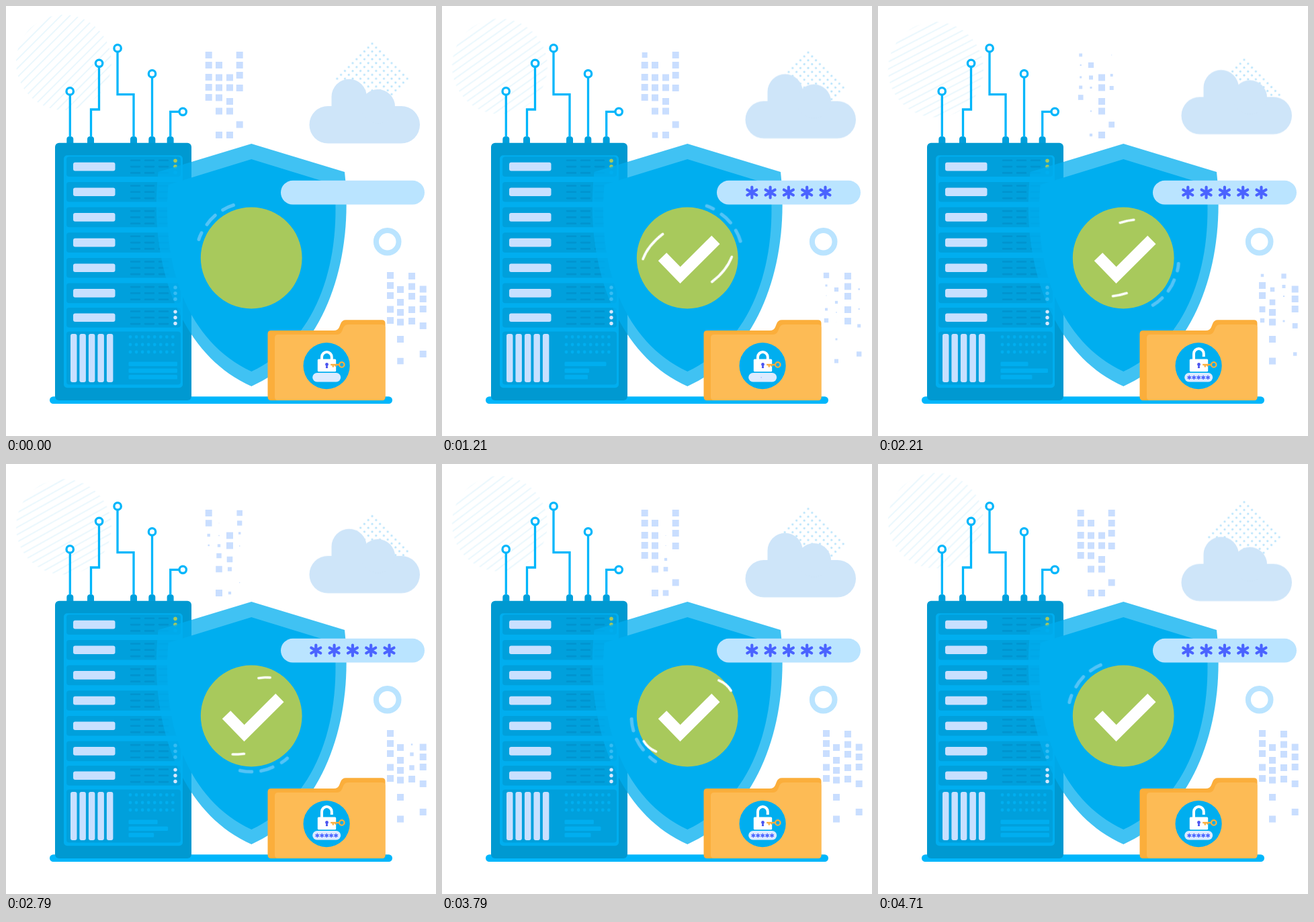
An HTML page without scripts for the animation above (4.78 s loop, 640 px wide and 640 px high).

```html
<!DOCTYPE html>
<html lang="en">
<head>
<meta charset="utf-8">
<title>Server security</title>
<style>
/* --t is the clock: milliseconds into the loop */
@property --t { syntax: "<number>"; inherits: true; initial-value: 0; }
html, body { margin: 0; width: 100%; height: 100%; overflow: hidden; background: #fff; }
svg { display: block; width: 100%; height: 100%; animation: clock 4780ms linear infinite; }
@keyframes clock { to { --t: 4780; } }

.drift { animation: drift 2390ms linear infinite alternate; }
@keyframes drift { to { transform: translateY(var(--dy)); } }
.turn { transform-origin: 86px 84px; animation: turn 2390ms linear infinite alternate; }
@keyframes turn { to { transform: rotate(19deg); } }
.spin { transform-origin: 365px 375px; animation: spin 4780ms linear infinite; }
@keyframes spin { to { transform: rotate(360deg); } }

/* each square vanishes at --z and grows back */
.blocks { fill: #c9deff; }
.blocks rect {
  width: 10px; height: 10px; transform-box: fill-box; transform-origin: center;
  scale: min(1, max(var(--t) - var(--z), var(--z) - var(--t)) / 780);
}

.stars { --gap: 150; }
.stars use {
  transform-box: fill-box; transform-origin: center;
  scale: clamp(0, (var(--t) - var(--from) - var(--gap) * var(--i)) / 150, 1);
}
.tick {
  stroke-dasharray: 113 200;
  stroke-dashoffset: calc(113px - 113px * clamp(0, (var(--t) - 100) / 860, 1));
  opacity: clamp(0, var(--t) - 100, 1);
}
.shackle { translate: 0 calc(-5px * clamp(0, (var(--t) - 1950) / 180, 1)); }

.gleam { animation: gleam 4780ms linear infinite; }
@keyframes gleam {
  0%, 14.6% { stroke-dasharray: 0 198; stroke-dashoffset: 190; opacity: 0; }
  14.7% { opacity: 1; }
  25.3% { stroke-dasharray: 48 150; stroke-dashoffset: 161; }
  46.2% { stroke-dasharray: 21 177; stroke-dashoffset: 77; }
  71.8% { stroke-dasharray: 13 185; stroke-dashoffset: 43; }
  88.1% { stroke-dasharray: 38 160; stroke-dashoffset: 3; }
  96.2% { stroke-dasharray: 0 198; stroke-dashoffset: -70; opacity: 1; }
  96.3%, 100% { stroke-dasharray: 0 198; stroke-dashoffset: -70; opacity: 0; }
}

.bars rect { x: 182.5px; height: 6.5px; animation: bar 4780ms linear infinite; }
@keyframes bar {
  0%, 98.5%, 100% { width: 72.5px; }
  10.5% { width: var(--a); }
  25.3% { width: var(--b); }
  46.2% { width: var(--c); }
  71.8% { width: var(--d); }
  88.1% { width: var(--e); }
}
</style>
</head>
<body>
<svg viewBox="0 0 640 640" xmlns="http://www.w3.org/2000/svg">
  <defs>
    <pattern id="hatch" width="9.5" height="9.5" patternUnits="userSpaceOnUse" patternTransform="translate(86 84) rotate(-45)">
      <path d="M0 4.75H9.5" stroke="#d8f1fc" stroke-width="1.1"/>
    </pattern>
    <pattern id="dots" width="8.2" height="8.2" patternUnits="userSpaceOnUse">
      <circle cx="4.1" cy="4.1" r="1.5" fill="#b5e2fb"/>
    </pattern>
    <path id="star" d="M0-8V8M-7-4 7 4M-7 4 7-4" fill="none" stroke="#4a63ff" stroke-width="4.2" stroke-linecap="round"/>
    <g id="unit">
      <rect x="90" y="-14.8" width="170" height="29.6" rx="4" fill="#00a0dc"/>
      <rect x="100" y="-6.3" width="62.5" height="12.6" rx="3" fill="#c8e0ff"/>
      <path d="M186-9.3h13m8 0h13m8 0h13M186 0h13m8 0h13m8 0h13M186 9.3h13m8 0h13m8 0h13" stroke="#0094cf" stroke-width="2.6" stroke-linecap="round"/>
    </g>
    <g id="leds">
      <circle cx="252" cy="-8.7" r="2.7"/><circle cx="252" r="2.7"/><circle cx="252" cy="8.7" r="2.7"/>
    </g>
    <rect id="slot" y="488" width="9.5" height="72" rx="3" fill="#c8e0ff"/>
    <path id="stub" d="M-5 205V198q0-4 5-4t5 4V205z" fill="#009fdb"/>
  </defs>

  <!-- background -->
  <g class="drift" style="--dy:11.5px"><circle class="turn" cx="86" cy="84" r="71" fill="url(#hatch)"/></g>
  <g class="drift" style="--dy:26px"><rect width="82" height="82" fill="url(#dots)" transform="translate(545 50.2) rotate(45)"/></g>
  <g class="drift" style="--dy:-14.7px" fill="#cee5f9">
    <rect x="451.5" y="149" width="164.5" height="55.5" rx="27.7"/>
    <path d="M484.5 170V135a26.2 26.2 0 0 1 52.4 0V170z"/>
    <circle cx="553.5" cy="149.5" r="25.5"/>
  </g>
  <circle cx="567.7" cy="350.8" r="16.8" fill="none" stroke="#bae4ff" stroke-width="8"/>

  <g class="blocks">
    <g transform="translate(296.7)">
      <rect y="68" style="--z:1840"/><rect y="83" style="--z:2040"/><rect y="101" style="--z:2450"/>
      <rect y="116" style="--z:2600"/><rect y="131" style="--z:2810"/>
    </g>
    <g transform="translate(312)">
      <rect y="83" style="--z:2850"/><rect y="101.5" style="--z:2680"/><rect y="116.5" style="--z:2450"/>
      <rect y="131.5" style="--z:2210"/><rect y="151.5" style="--z:2050"/><rect y="187" style="--z:1880"/>
    </g>
    <g transform="translate(328)">
      <rect y="101.5" style="--z:3860"/><rect y="116.5" style="--z:3710"/><rect y="137" style="--z:3460"/>
      <rect y="151.5" style="--z:3270"/><rect y="187" style="--z:3120"/>
    </g>
    <g transform="translate(342.7)">
      <rect y="68" style="--z:2130"/><rect y="83" style="--z:2220"/><rect y="98" style="--z:2520"/>
      <rect y="117" style="--z:2680"/><rect y="171.5" style="--z:2890"/>
    </g>
    <g transform="translate(567)">
      <rect y="396" style="--z:1860"/><rect y="411" style="--z:970"/><rect y="426" style="--z:1290"/>
      <rect y="446.5" style="--z:1520"/><rect y="463" style="--z:1710"/>
    </g>
    <g transform="translate(582)">
      <rect y="417" style="--z:1700"/><rect y="436" style="--z:1540"/><rect y="451" style="--z:1330"/>
      <rect y="465.5" style="--z:1180"/><rect y="491" style="--z:980"/><rect y="523.5" style="--z:740"/>
    </g>
    <g transform="translate(599)">
      <rect y="397" style="--z:2780"/><rect y="412.5" style="--z:2600"/><rect y="427" style="--z:2370"/>
      <rect y="447" style="--z:2210"/><rect y="464" style="--z:1980"/>
    </g>
    <g transform="translate(615.7)">
      <rect y="416.5" style="--z:1010"/><rect y="431" style="--z:1190"/><rect y="446" style="--z:1370"/>
      <rect y="471" style="--z:1600"/><rect y="513" style="--z:1790"/>
    </g>
  </g>

  <!-- server -->
  <rect x="65" y="581.3" width="510" height="10.7" rx="5.3" fill="#00b6fb"/>
  <use href="#stub" x="95.3"/><use href="#stub" x="126"/><use href="#stub" x="190"/><use href="#stub" x="217.3"/><use href="#stub" x="244.6"/>
  <g fill="none" stroke="#00b6fb" stroke-width="3.3">
    <path d="M95.3 132V195M138.5 91V154H126.5V195M166 68V131.7H190V195M217.5 106V195M258 157.3H244.7V195"/>
    <g fill="#fff">
      <circle cx="95.2" cy="126.9" r="5.2"/><circle cx="138.6" cy="85.3" r="5.2"/><circle cx="166.1" cy="62.9" r="5.2"/>
      <circle cx="217.5" cy="100.9" r="5.2"/><circle cx="263.2" cy="157.3" r="5.2"/>
    </g>
  </g>
  <rect x="73" y="203.7" width="203" height="383.3" rx="6" fill="#0099d1"/>
  <rect x="86" y="222.3" width="177" height="346" rx="5" fill="#00aeef"/>
  <use href="#unit" y="239.1"/><use href="#unit" y="276.8"/><use href="#unit" y="314.4"/><use href="#unit" y="352.1"/>
  <use href="#unit" y="389.8"/><use href="#unit" y="427.4"/><use href="#unit" y="463.8"/>
  <g fill="#a8c95c"><circle cx="252" cy="230.2" r="2.8"/><circle cx="252" cy="239" r="2.8"/></g>
  <circle cx="252" cy="247.7" r="2.8" fill="#00aeef"/>
  <use href="#leds" y="427.6" fill="#d6e8ff"/><use href="#leds" y="463.8" fill="#d6e8ff"/>
  <rect x="90" y="484.5" width="170" height="79" rx="4" fill="#00a0dc"/>
  <use href="#slot" x="96"/><use href="#slot" x="109.4"/><use href="#slot" x="122.9"/><use href="#slot" x="136.4"/><use href="#slot" x="149.9"/>
  <path d="M185 492.5H249M185 504H249M185 515H249" stroke="#00aeef" stroke-width="4.8" stroke-linecap="round" stroke-dasharray="0 9.05"/>
  <g class="bars" fill="#00aeef">
    <rect y="529.6" rx="1.5" style="--a:57.5px;--b:62px;--c:41px;--d:45.5px;--e:41px"/>
    <rect y="539.4" rx="1.5" style="--a:51.5px;--b:36.5px;--c:70.5px;--d:45.5px;--e:64px"/>
    <rect y="549.1" rx="1.5" style="--a:65.5px;--b:34.5px;--c:47px;--d:27.5px;--e:52.5px"/>
  </g>

  <!-- shield -->
  <g fill="#00aeef">
    <path opacity=".75" d="M365.3 205 504 247C519 385 470 520 365.3 566 260 520 211 385 226.6 247z"/>
    <path d="M365.3 228 489 266C499 390 459 500 365.3 544 271 500 231 390 241.6 266z"/>
  </g>
  <g class="spin" fill="none" stroke="#c9dfff" stroke-opacity=".42" stroke-width="5" stroke-linecap="round">
    <path d="M287 347.5Q288.5 342.5 291 337.8M299 325.3Q304 318 311.3 311.7M322.6 303.6Q330 299 338.4 296.4"/>
  </g>
  <circle cx="365.2" cy="375" r="75.4" fill="#a8c95c"/>
  <path class="tick" d="M328 373.3 354.6 400.6 407.4 348" fill="none" stroke="#fff" stroke-width="17.4"/>
  <ellipse class="gleam" cx="365.2" cy="375" rx="75" ry="50" transform="rotate(-30 365.2 375)" pathLength="396" fill="none" stroke="#fff" stroke-width="3.6" stroke-linecap="round"/>

  <!-- password field -->
  <rect x="409" y="259.8" width="214" height="35.7" rx="17.8" fill="#bae4ff"/>
  <g class="stars" style="--from:50">
    <use href="#star" x="461.3" y="277.5" style="--i:0"/><use href="#star" x="488.6" y="277.5" style="--i:1"/>
    <use href="#star" x="515.9" y="277.5" style="--i:2"/><use href="#star" x="543.2" y="277.5" style="--i:3"/>
    <use href="#star" x="570.5" y="277.5" style="--i:4"/>
  </g>

  <!-- folder -->
  <path fill="#fbae3b" d="M389.5 582V488q0-5 5-5H488q6 0 8-5l2-5q2-5.7 8-5.7H559.500q5 0 5 5V582q0 5-5 5H394.500q-5 0-5-5z"/>
  <path fill="#fdbb55" d="M405 587q-5 0-5-5V494q0-5 5-5H492q6 0 8-5l2-5q2-5 8-5H559.500q5 0 5 5V582q0 5-5 5z"/>
  <circle cx="477.1" cy="535.6" r="34.6" fill="#00aeef"/>
  <path class="shackle" d="M470 535V522.500a7.4 7.4 0 0 1 14.800 0V527" fill="none" stroke="#fff" stroke-width="4"/>
  <rect x="463.8" y="525.6" width="27.400" height="18.600" rx="1.500" fill="#fff"/>
  <g fill="#4a55f0"><circle cx="477.500" cy="533.500" r="2.400"/><path d="M476.500 534h2l.6 5h-3.200z"/></g>
  <g fill="none" stroke="#fbae3b" stroke-width="2.300">
    <circle cx="499.800" cy="533.900" r="3.700"/><path d="M496 533.900H483.200M486.800 534v3.400M490.300 534v2.600"/>
  </g>
  <rect x="456.200" y="546" width="42" height="13.400" rx="6.700" fill="#dcebff"/>
  <g class="stars" style="--from:1190" transform="translate(477.200 552.900) scale(.33)">
    <use href="#star" x="-42" style="--i:0"/><use href="#star" x="-21" style="--i:1"/><use href="#star" style="--i:2"/>
    <use href="#star" x="21" style="--i:3"/><use href="#star" x="42" style="--i:4"/>
  </g>
</svg>
</body>
</html>
```
